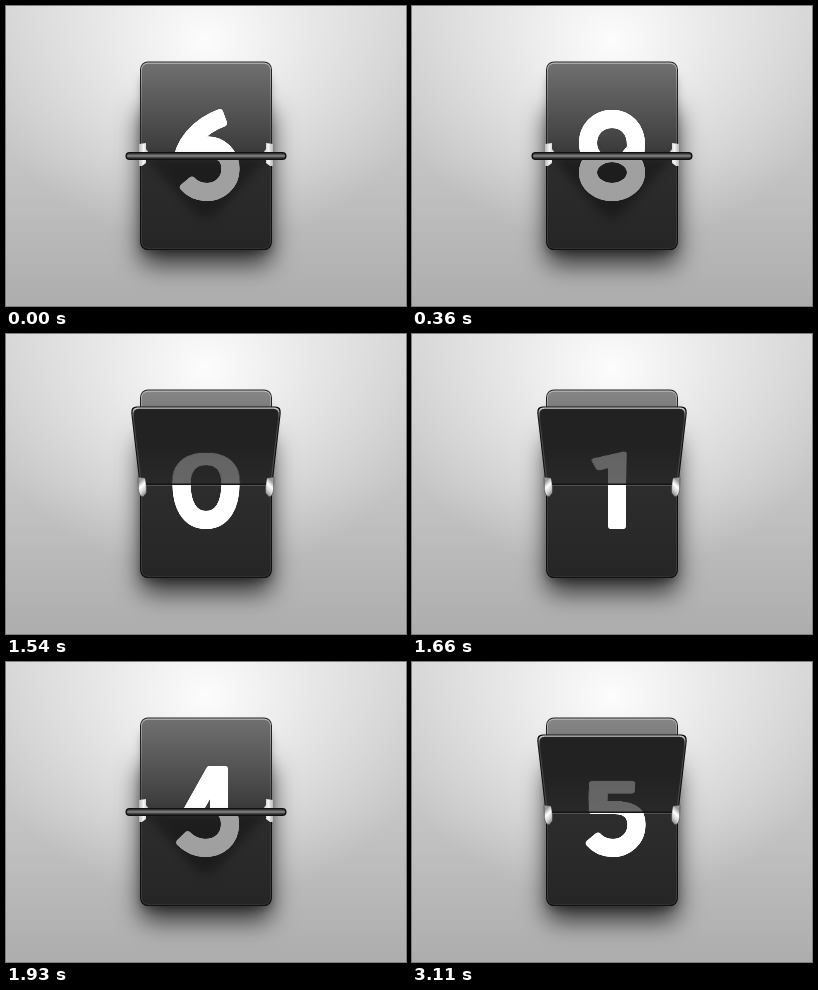
An HTML page with a canvas for the animation above (3.14 s loop, 400 by 300 pixels).

```html
<!DOCTYPE html>
<html lang="en">
<head>
<meta charset="utf-8">
<title>Flip counter</title>
<style>
html, body { margin: 0; width: 100%; height: 100%; overflow: hidden; background: #c4c4c4; }
canvas { display: block; }
</style>
</head>
<body>
<canvas id="stage" width="400" height="300"></canvas>
<script>
const ctx = document.getElementById('stage').getContext('2d');
const MID = 150;

// Centre lines of the digits; the pen below gives them softly rounded ends.
const STROKES = [
  'M200 113C217 113 224.5 129 224.5 149.5S217 186 200 186 175.5 170 175.5 149.5 183 113 200 113Z',
  'M185 121L205 114V192.5',
  'M178 125C184 117 191 113 200 113C212 113 220 120 220 131C220 140 214 146 207 154L184 186.5H223',
  'M179 113H214L200 140C215 140 224 149 224 162C224 177 213 186 199 186C190 186 183 182 177 176',
  'M213 192.5V113H207L175 170V174H231',
  'M219.5 113.5H187L186 143H203C216 143 224.5 150 224.5 163C224.5 177 213 186 201 186C193 186 186 183 181 177',
  'M216.5 111.5C193 120 176 139 176 160C176 176 186 186 200 186C214 186 224 175.5 224 162C224 149 214 139.5 201 139.5C191 139.5 183 145 179 152',
  'M173 113.5H217L183 191.5',
  'M200 113a20 17 0 1 1 0 34a20 17 0 1 1 0-34M200 147a24 19.5 0 1 1 0 39a24 19.5 0 1 1 0-39',
  'M183.5 187.5C207 179 224 160 224 139C224 123 214 113 200 113C186 113 176 123.5 176 137C176 150 186 159.5 199 159.5C209 159.5 217 154 221 147'
];

function layer(paint) {
  const c = document.createElement('canvas');
  c.width = 400;
  c.height = 300;
  paint(c.getContext('2d'));
  return c;
}

const glyphs = STROKES.map(d => layer(g => {
  const path = new Path2D(d);
  g.strokeStyle = '#fff';
  g.lineWidth = 13;
  for (let a = 0; a < 24; a++) {
    const angle = a * Math.PI / 12;
    g.setTransform(1, 0, 0, 1, 2.5 * Math.cos(angle), 2.5 * Math.sin(angle));
    g.stroke(path);
  }
}));

function fade(g, x0, y0, x1, y1, ...colors) {
  const f = g.createLinearGradient(x0, y0, x1, y1);
  colors.forEach((c, i) => f.addColorStop(i / (colors.length - 1), c));
  return f;
}

function box(x, y, w, h, r) {
  const p = new Path2D();
  p.roundRect(x, y, w, h, r);
  return p;
}

const backdrop = layer(g => {
  g.fillStyle = fade(g, 0, 0, 0, 300, '#d2d2d2', '#c5c5c5', '#adadad');
  g.fillRect(0, 0, 400, 300);
  const glow = g.createRadialGradient(0, 35, 0, 0, 35, 205);
  glow.addColorStop(0, 'rgba(255,255,255,.95)');
  glow.addColorStop(.45, 'rgba(255,255,255,.5)');
  glow.addColorStop(1, 'rgba(255,255,255,0)');
  g.fillStyle = glow;
  g.save();
  g.translate(200, 0);
  g.scale(1.15, 1);
  g.fillRect(-200, 0, 400, 300);
  g.restore();
  g.fillStyle = '#151515';
  for (const [top, blur, dy, alpha] of [[90, 26, 14, .75], [66, 8, 3, .3]]) {
    g.shadowColor = `rgba(0,0,0,${alpha})`;
    g.shadowBlur = blur;
    g.shadowOffsetY = dy;
    g.fill(box(135, top, 130, 244 - top, 7));
  }
});

function topHalf(digit, colors) {
  ctx.fillStyle = '#222';
  ctx.fill(box(134, 55.5, 132, 95, [8, 8, 0, 0]));
  ctx.fillStyle = fade(ctx, 0, 56, 0, 150, '#bbb', '#707070', '#555');
  ctx.fill(box(135, 56.5, 130, 93, [7, 7, 0, 0]));
  ctx.fillStyle = fade(ctx, 0, 57, 0, 150, ...colors);
  ctx.fill(box(135.8, 57.8, 128.4, 92.2, [6, 6, 0, 0]));
  ctx.drawImage(glyphs[digit], 0, 0, 400, MID, 0, 0, 400, MID);
}

function bottomHalf(digit, shade, alpha, underShadow) {
  ctx.fillStyle = '#111';
  ctx.fill(box(134, MID, 132, 94, [0, 0, 8, 8]));
  ctx.fillStyle = '#3c3c3c';
  ctx.fill(box(135, MID, 130, 92.8, [0, 0, 7, 7]));
  ctx.fillStyle = fade(ctx, 0, MID, 0, 242, ...shade);
  ctx.fill(box(135.8, MID, 128.4, 92, [0, 0, 6, 6]));
  if (underShadow) {
    ctx.save();
    ctx.filter = 'blur(5px)';
    ctx.fillStyle = 'rgba(0,0,0,.32)';
    ctx.fill(new Path2D('M140 152H260L212 206Q200 216 188 206Z'));
    ctx.restore();
  }
  ctx.globalAlpha = alpha;
  ctx.drawImage(glyphs[digit], 0, MID, 400, 150, 0, MID, 400, 150);
  ctx.globalAlpha = 1;
}

function seam() {
  ctx.fillStyle = '#151515';
  ctx.fillRect(135, 149.5, 130, 1.5);
  ctx.fillStyle = 'rgba(255,255,255,.22)';
  ctx.fillRect(135, 151, 130, .8);
}

function bothSides(paint) {
  for (const side of [1, -1]) {
    ctx.save();
    ctx.translate(200, 0);
    ctx.scale(side, 1);
    ctx.translate(-200, 0);
    paint();
    ctx.restore();
  }
}

function hinges(y0, y1) {
  const p = new Path2D(`M132 ${y0}L139 ${y0 + 1}Q140.5 ${y0 + 7} 140.5 ${y1 - 4}L137 ${y1}Q133 ${y1 - 1} 132.5 ${y1 - 8}Z`);
  bothSides(() => {
    ctx.fillStyle = fade(ctx, 132, y0 + 6, 142, y1 - 4, '#999', '#fff', '#d0d0d0', '#777');
    ctx.fill(p);
    ctx.strokeStyle = 'rgba(20,20,20,.5)';
    ctx.lineWidth = .7;
    ctx.stroke(p);
  });
}

// Tilted leaf; dir is -1 above the axis and 1 below it.
function leaf(digit, dir, colors, alpha) {
  const reach = dir < 0 ? 77 : 79;
  const edge = MID + dir * reach;
  const shape = inset => {
    const e = edge - dir * inset, l = 125 + inset, r = 275 - inset;
    return new Path2D(`M${134 + inset} ${MID}L${l + .8} ${e - dir * 7}Q${l} ${e} ${l + 6} ${e}H${r - 6}Q${r} ${e} ${r - .8} ${e - dir * 7}L${266 - inset} ${MID}Z`);
  };
  ctx.fillStyle = '#0c0c0c';
  ctx.fill(shape(-.5));
  ctx.fillStyle = fade(ctx, 0, edge, 0, edge - dir * 12, '#ddd', '#888', '#484848');
  ctx.fill(shape(.6));
  ctx.fillStyle = fade(ctx, 0, edge, 0, MID, ...colors);
  ctx.fill(shape(1.8));
  ctx.globalAlpha = alpha;
  for (let h = 0; h < 40; h++) {
    const w = 400 * (1 + 9 / 66 * (h + .5) / reach);
    const from = dir < 0 ? MID - (h + 1) / .68 : MID + h / .68;
    ctx.drawImage(glyphs[digit], 0, from, 400, 1 / .68, 200 - w / 2, dir < 0 ? MID - h - 1 : MID + h, w, 1);
  }
  ctx.globalAlpha = 1;
}

function edgeOn() {
  bothSides(() => {
    ctx.fillStyle = fade(ctx, 132, 0, 143, 0, '#aaa', '#f5f5f5', '#bbb');
    ctx.fill(new Path2D('M133 138L140 137V143L143 147H133ZM133 153H140V157L136 160H133Z'));
  });
  ctx.fillStyle = '#101010';
  ctx.fill(box(119.5, 146, 161, 8, 4));
  ctx.fillStyle = fade(ctx, 0, 147, 0, 153, '#222', '#555', '#8a8a8a', '#444', '#1c1c1c');
  ctx.fill(box(121, 147, 158, 6, 3));
}

const TOP = ['#484848', '#4b4b4b', '#525252'];
const TOP_LIT = ['#868686', '#6a6a6a', '#555'];
const TOP_SHADED = ['#707070', '#555', '#383838'];
const BOTTOM = ['#4b4b4b', '#3a3a3a', '#272727'];
const BOTTOM_DIM = ['#2d2d2d', '#2a2a2a', '#252525'];

// Four poses per flip: raised, edge on, lowered, settled.
function draw(step) {
  const pose = step % 4;
  const prev = (5 + (step >> 2)) % 10;
  const next = (prev + 1) % 10;
  ctx.drawImage(backdrop, 0, 0);
  topHalf(next, [TOP_LIT, TOP_SHADED, TOP, TOP][pose]);
  if (pose === 0) {
    bottomHalf(prev, BOTTOM_DIM, 1);
    leaf(prev, -1, ['#222', '#222', '#292929'], .29);
    seam();
    hinges(143, 163);
  } else if (pose === 1) {
    bottomHalf(prev, BOTTOM_DIM, .58, true);
    edgeOn();
  } else if (pose === 2) {
    bottomHalf(prev, BOTTOM_DIM, 1);
    leaf(next, 1, ['#555', '#4d4d4d', '#474747'], 1);
    seam();
    hinges(137, 157);
  } else {
    bottomHalf(next, BOTTOM, 1);
    seam();
    hinges(137, 160);
  }
}

function stepAt(t) {
  if (t >= 3110) return 0;
  if (t < 1540) return Math.min(19, 1 + Math.floor(t / 30));
  return Math.min(39, 20 + Math.floor((t - 1540) / 30));
}

function tick() {
  draw(stepAt(performance.now() % 3140));
  requestAnimationFrame(tick);
}
tick();
</script>
</body>
</html>
```
